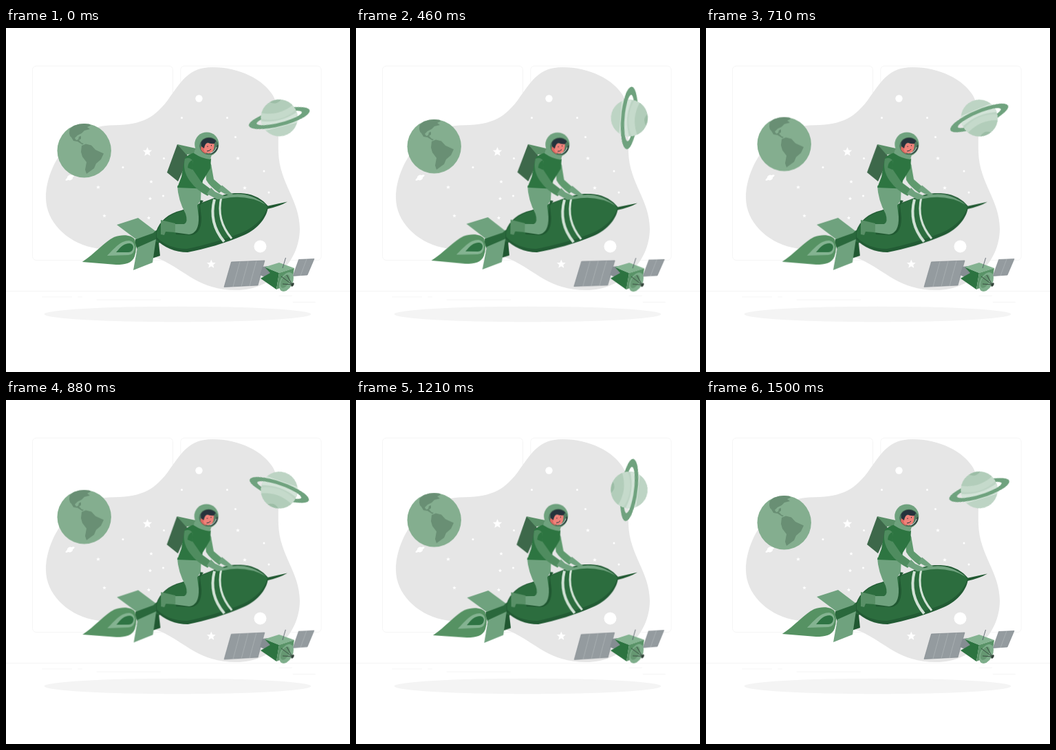
Recreate the animation shown at these times as an HTML page. Size 500 by 500 pixels, loop 1540 ms.

```html
<!DOCTYPE html>
<html lang="en">
<head>
<meta charset="utf-8">
<title>Rocket ride</title>
<style>
html, body { margin: 0; width: 100%; height: 100%; overflow: hidden; background: #fff; }
svg { display: block; width: 100vw; height: 100vh; }
.float, .sway, .spin { animation: 1540ms linear infinite; }
.float { animation-name: float; }
.sway { animation-name: sway; }
.spin { animation-name: spin; transform-origin: 0 0; }
#rider { transform-origin: 260px 252px; }
#satellite { transform-origin: 382px 359px; }
@keyframes float {
  0%, 97.4%, 100% { transform: translateY(0); }
  48.7% { transform: translateY(-10px); }
}
@keyframes sway {
  0%, 97.4%, 100% { transform: rotate(0); }
  24.35% { transform: rotate(1deg); }
  73.05% { transform: rotate(-1deg); }
}
@keyframes spin {
  0% { transform: rotate(-14.5deg); }
  29.9% { transform: rotate(94.5deg); }
  64.9% { transform: rotate(229deg); }
  97.4%, 100% { transform: rotate(343deg); }
}
</style>
</head>
<body>
<svg viewBox="0 0 500 500">
  <defs>
    <path id="star" d="M0-1 .27-.35 .95-.31 .43.14 .59.81 0 .45-.59.81-.43.14-.95-.31-.27-.35Z"/>
    <clipPath id="disc"><circle r="26.8"/></clipPath>
    <clipPath id="globe"><circle cx="113.7" cy="178.2" r="39.2"/></clipPath>
    <clipPath id="visor"><ellipse cx="295" cy="171.5" rx="13.3" ry="12.3"/></clipPath>
  </defs>

  <g fill="none" stroke="#ebebeb" stroke-width=".5">
    <path d="M0 382.5H500M52.5 390.9H95.6M104.6 390.9H110.9M131.5 395.1H225M396.6 389.2H415.8M416.8 398.5H449.9"/>
    <rect x="38.5" y="55.2" width="204" height="282.4" rx="5.5"/>
    <rect x="253.8" y="55.2" width="204.4" height="282.4" rx="5.5"/>
  </g>
  <path fill="#e6e6e6" d="M300 57C340 57 374 75 388 98C400 120 395 150 396 180C397 225 427 250 427 292C427 340 385 381 335 381C280 381 262 353 225 336.500C190 322 160 326 125 319C88 311 58 281 58 247C58 205 90 145 150 141.500C194 141 213 134 235 105C255 77 266 57 300 57Z"/>
  <ellipse cx="249.5" cy="416" rx="193.9" ry="11.3" fill="#f4f4f4"/>

  <g id="stars" fill="#fff">
    <circle cx="280.5" cy="102.5" r="5.2"/>
    <circle cx="369.5" cy="317.5" r="9"/>
    <g transform="translate(93 217.5) rotate(-30)">
      <ellipse rx="7.6" ry="2"/><circle r="3.8"/>
    </g>
  </g>

  <g class="float">
    <circle cx="113.7" cy="178.2" r="39.2" fill="#84ae8f"/>
    <path clip-path="url(#globe)" fill="#698f74" d="M92 153 92.500 147 103 138H120L123 141.500 118 144 122 147 114 149 110 153 104 156 100 160 102 163 105 162 106 158 109 157 109 161 106 163 110 167 113 168 111 169.500 104 165 98 164 95 159 93 157ZM110 171 116 168.500 124 170.500 130 177 142 182.500 138 191 131 197 128 204 117 212 115 206 117 195 111 187 109 180Z"/>
  </g>

  <g transform="translate(397.2 130.8)"><g class="spin">
    <path fill="#6fa27e" fill-rule="evenodd" d="M-45.500 0A45.500 11.800 0 0 1 45.500 0A45.500 11.800 0 0 1-45.500 0ZM-34 0A34 6.800 0 0 0 34 0A34 6.800 0 0 0-34 0Z"/>
    <g clip-path="url(#disc)">
      <circle r="27" fill="#bdd4c4"/>
      <path fill="#d3e3d8" d="M-27-2Q0 8 27-2V13H-27Z"/>
      <path fill="#c5dacb" d="M-27-6Q0 8 27-6V-28H-27Z"/>
      <path fill="#b2cdba" d="M-27-15Q0-1 27-15V-28H-27Z"/>
      <path fill="#9cbda6" d="M-9-27Q0-18 9-25V-29H-9Z"/>
    </g>
    <path fill="#6fa27e" d="M-45.500 0A45.500 11.800 0 0 0 45.500 0H34A34 6.800 0 0 1-34 0Z"/>
  </g></g>

  <g id="satellite" class="sway">
    <g fill="#949b9f" stroke="#798187" stroke-width=".6">
      <path d="M327.500 340 376 338 366 374 317 376.500Z"/>
      <path d="M425.500 336.500 448 335.500 438 359 417 360.500Z"/>
      <path fill="none" stroke="#b4babd" d="M340 339.500 330 376M352 339 342 375.500M364 338.500 354 375M437 336 428 360"/>
    </g>
    <path fill="#858d92" d="M373 347 380 346 386 357 376 362 369 359Z"/>
    <path fill="#2c7340" d="M376 347.500 397 356 393 380 370 364 384 356Z"/>
    <path fill="#84b391" d="M376 347.500 397 341 419 349 397 356Z"/>
    <path fill="#599367" d="M397 356 419 349 415 371 393 380Z"/>
    <path fill="none" stroke="#45505a" stroke-width=".8" d="M402 349 406.500 334"/>
    <g transform="translate(407.500 369) rotate(27)">
      <ellipse rx="9" ry="15" fill="#7eae8b"/>
      <ellipse cx="-2" rx="5.500" ry="10.500" fill="#669872"/>
    </g>
    <path fill="none" stroke="#34443b" stroke-width=".9" d="M400 361 416 373M402 372 416 373M408 359 416 373"/>
    <ellipse cx="416.500" cy="373" rx="1.800" ry="3" fill="#34443b" transform="rotate(27 416.500 373)"/>
  </g>

  <g id="rider" class="sway">
    <path fill="#569263" d="M110.800 340C128 329 143 311 157 304C170 299 183 301 187 307Q191 319 187 332C183 342 174 344 160 344Z"/>
    <path fill="#84b391" d="M147 331C157 321 166 309 179 309Q186 310 187 318Q187 329 178 330Z"/>
    <path fill="#2f7444" d="M160 326C167 318 171 313 180 313Q185 314 185 319Q184 326 178 326Z"/>
    <path fill="#2a683c" d="M188 307 219 294 224 312 191 322Q187 314 188 307Z"/>
    <path fill="#205831" d="M214 309 222 312 224 331 209 336Z"/>
    <path fill="#6fa27e" d="M161 286 192 276 217 295 214 298 189 307Z"/>
    <path fill="#6fa27e" d="M191 319 218 307 213 341 185 352Z"/>

    <path fill="#205831" d="M379 259 409 252.500Q398 259 380 263Z"/>
    <path fill="#225b34" d="M218 296C224 280 235 270 255 265L300 248C318 241 330 239 346 240.500C361 242 373 249 381 259C380 274 367 292 346 301C319 313 289 321 264 326C246 326 229 319 218 307Z"/>
    <path fill="#2c6d3e" d="M219 297C225 281 236 271 256 266L300 249C318 242 331 241 346 243C361 245 372 251 380 260C376 275 363 288 344 297C316 308 288 316 263 321C245 321 229 315 219 304Z"/>
    <path fill="#6fa27e" d="M316 244.500Q350 234 378 257Q350 241 316 248Z"/>
    <g fill="none" stroke="#d2e2d6">
      <path stroke-width="4" d="M303 249Q294 283 317 310.500"/>
      <path stroke-width="3" d="M313 246Q305 279 328 306"/>
    </g>
    <path fill="#205831" d="M282 250 287 251 282 258 284 276Q284 298 270 301L247 300 246 294 268 293 279 280Z"/>

    <path fill="#5f9a6e" d="M289 192Q299 194 299 203L302 220 317 233 310 240Q296 230 291 221Z"/>
    <path fill="#6fa27e" d="M314 228.500 323 236 330 242 326 244 318 241 309 236Z"/>

    <path fill="#6fa27e" d="M249 229H284L283 250 278 258 280 274Q281 298 266 300L244 297 244 285 259 285Q265 282 261 270Q250 250 249 229Z"/>
    <path fill="#599067" d="M225 279 246 284 246 297 232 296 230 301 225 300Z"/>
    <path fill="#3d684a" d="M249 169 262 181 265 190 250 223 234 210Z"/>
    <path fill="#5a9068" d="M249 169 276 175 286 182 262 184Z"/>
    <path fill="#2d7541" d="M260 189Q265 183 275 181L298 190 297 204 286 222 284 233.500 249 232 255 216Z"/>
    <path fill="#4f8c5f" d="M260 190Q268 187 272 194L271 205 284 224 300 236 293 244Q277 236 267 222Q256 207 260 190Z"/>
    <path fill="#2d7541" d="M264 203Q265 194 271 192Q273 198 271 206Z"/>
    <path fill="#6fa27e" d="M298 232 304 238 317 244 316 248 307 249 292 241Z"/>

    <path fill="#6fa27e" d="M275 176 299 184 297 191Q285 190 273 182Z"/>
    <circle cx="291.800" cy="169" r="17.600" fill="#6fa27e"/>
    <g clip-path="url(#visor)">
      <rect x="280" y="158" width="32" height="28" fill="#527b60"/>
      <path fill="#dc6961" d="M284 171 290 174 291 187H281Z"/>
      <path fill="#ef827a" d="M286 169 302 165Q304 174 300 180Q293 185 288 179Z"/>
      <path fill="#26333c" d="M284 172Q282 162 288 160Q299 155 306 163L303 168Q297 169 293 166.500Q289 168 288 175Z"/>
      <path fill="none" stroke="#26333c" stroke-width="1" d="M293 171.500V173M298.500 170V171.500M292 179Q296 179 298 176"/>
      <path fill="none" stroke="#26333c" stroke-width="2" d="M308 170Q307 180 297 184"/>
      <path fill="none" stroke="#d5e3d9" stroke-width="1" d="M306 173Q304 180 297 182"/>
    </g>
    <ellipse cx="295" cy="171.500" rx="13.300" ry="12.300" fill="none" stroke="#42664e" stroke-width=".8"/>
  </g>
</svg>
<script>
const sky = document.getElementById('stars');
const add = (tag, attrs) => {
  const el = document.createElementNS('http://www.w3.org/2000/svg', tag);
  for (const key in attrs) el.setAttribute(key, attrs[key]);
  sky.append(el);
};
const stars = [
  [205.5, 180, 7], [298.3, 343.3, 6.8], [134, 231.5, 3], [211, 223.5, 2.8], [209.5, 248, 2.8],
  [143, 273, 2.8], [207.5, 276, 2.8], [337, 189.5, 3], [347, 232.5, 3]
];
const dots = [
  [333.5, 158.5], [255.5, 130.5], [321.5, 130.5], [170, 202.5],
  [229.5, 189.5], [228.5, 244], [375, 208], [382, 239]
];
for (const [x, y, r] of stars) add('use', { href: '#star', transform: `translate(${x} ${y}) scale(${r})` });
for (const [cx, cy] of dots) add('circle', { cx, cy, r: 1.5 });
</script>
</body>
</html>
```
